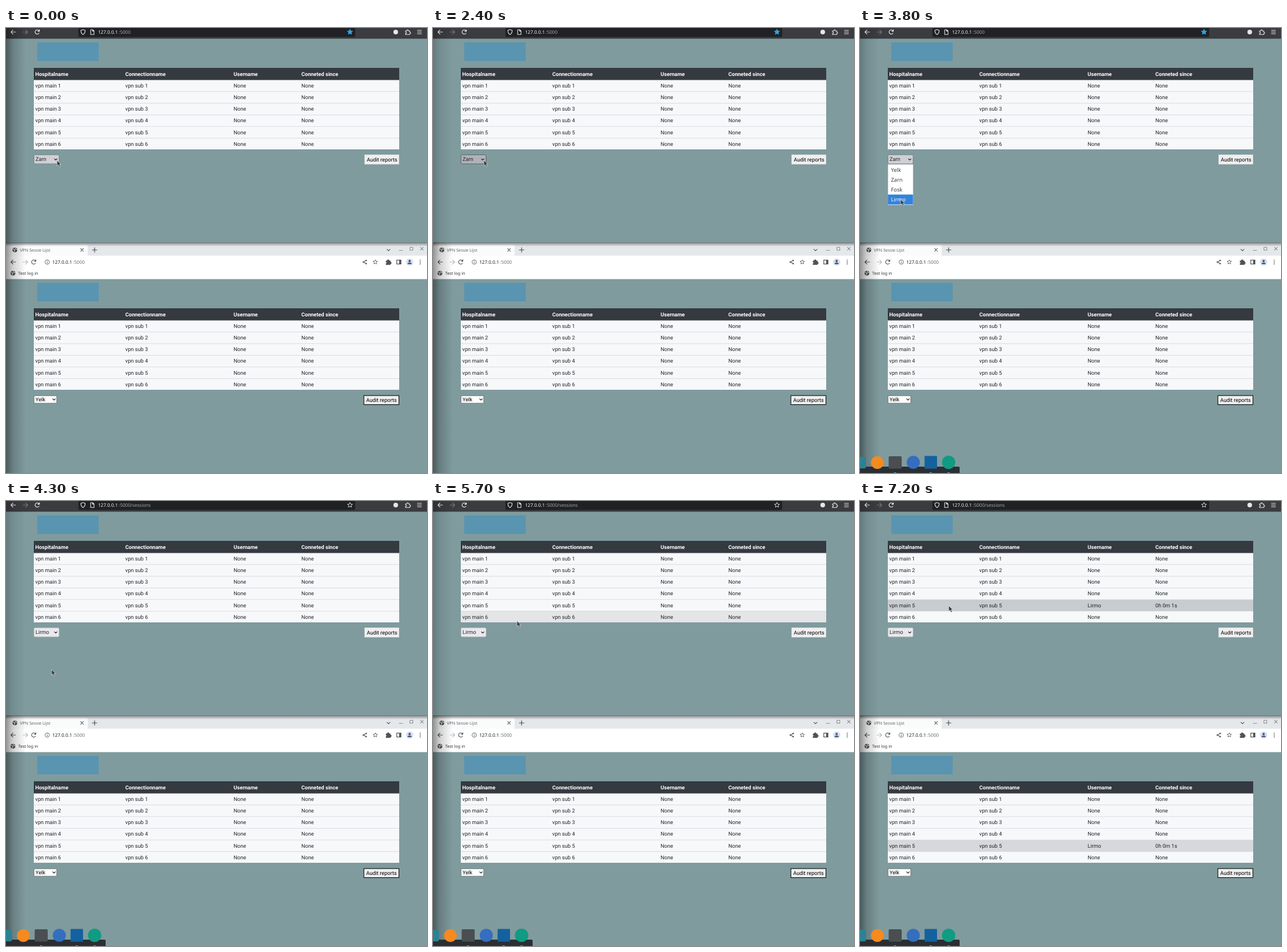
Animation, 727 px wide and 770 px high, one loop 8000 ms. Source, as an HTML page:

```html
<!DOCTYPE html>
<html lang="en">
<head>
<meta charset="utf-8">
<title>VPN session list</title>
<style>
html, body { margin: 0; width: 100%; height: 100%; overflow: hidden; background: #7f9b9e; }
svg { display: block; width: 727px; height: 770px; }
text { white-space: pre; text-rendering: geometricPrecision; }
.page { font: 9.15px Roboto, sans-serif; fill: #212529; }
.head { font-weight: 700; fill: #fff; }
.ui { font: 8.05px "Noto Sans", sans-serif; }
.small { font: 7.25px "Noto Sans", sans-serif; }
.menu { font: 9.25px "Noto Sans", sans-serif; }
.icon { fill: none; stroke-width: 1.1; stroke-linecap: round; stroke-linejoin: round; }
</style>
</head>
<body>
<svg id="stage" viewBox="0 0 727 770">
  <defs>
    <linearGradient id="side">
      <stop offset="0" stop-opacity=".42"/>
      <stop offset=".35" stop-opacity=".18"/>
      <stop offset="1" stop-opacity="0"/>
    </linearGradient>
    <linearGradient id="drop" x2="0" y2="1">
      <stop offset="0" stop-opacity=".42"/>
      <stop offset="1" stop-opacity="0"/>
    </linearGradient>
  </defs>
</svg>
<script>
const LOOP = 8000;
const USERS = ["Yelk", "Zarn", "Fosk", "Lirmo"];
const COLUMNS = [50.5, 206, 393, 510];
const ROW_TOP = 89.7, ROW_STEP = 20.2, LOWER = 416;
const OPTION_TOP = 236.6, OPTION_STEP = 17.2;
const stage = document.getElementById("stage");

function add(tag, attrs, parent = stage) {
  const el = document.createElementNS("http://www.w3.org/2000/svg", tag);
  for (const key in attrs) el.setAttribute(key, attrs[key]);
  return parent.appendChild(el);
}
const rect = (x, y, width, height, fill, more, parent) =>
  add("rect", { x, y, width, height, fill, ...more }, parent);
const circle = (cx, cy, r, fill, more, parent) => add("circle", { cx, cy, r, fill, ...more }, parent);
const line = (d, stroke, more, parent) => add("path", { d, stroke, class: "icon", ...more }, parent);
function label(x, y, content, cls = "page", more, parent) {
  const el = add("text", { x, y, class: cls, ...more }, parent);
  el.textContent = content;
  return el;
}

// Icons
function navigation(y, color, dim) {
  line(`M16.5 ${y}h-8m3.6-3.6l-3.6 3.6l3.6 3.6`, color);
  line(`M29.5 ${y}h8m-3.6-3.6l3.6 3.6l-3.6 3.6`, dim);
}
const reload = (x, y, color) =>
  line(`M${x + 3} ${y + 2}a3.7 3.7 0 1 1 0-4.2m.6-1.8v2.6h-2.6`, color, { "stroke-width": 1.3 });
function star(x, y, r, color, fill = "none") {
  const points = Array.from({ length: 10 }, (_, i) => {
    const a = i * Math.PI / 5 - Math.PI / 2, len = i % 2 ? r * .46 : r;
    return `${x + len * Math.cos(a)},${y + len * Math.sin(a)}`;
  });
  return add("polygon", { points: points.join(" "), fill, stroke: color, "stroke-width": .9, "stroke-linejoin": "round" });
}
const puzzle = (x, y, color, fill) =>
  line(`M${x - 3.6} ${y - 2}h2.3a1.4 1.4 0 1 1 2.6 0h2.3v2.2a1.3 1.3 0 1 1 0 2.5v1.6h-7.2v-1.8a1.3 1.3 0 1 0 0-2.5z`, color, { style: `fill:${fill}` });
function globe(x, y) {
  circle(x, y, 4.1, "#4b4f54");
  line(`M${x - 3} ${y - 1.4}l2.4 .8l.6 1.7l-1.2 1.6M${x + .6} ${y - 3}l1 1.8l1.8 .4`, "#fff", { "stroke-width": 1 });
}

// Page content shared by both windows
function sessions(dy) {
  const g = add("g", { transform: `translate(0 ${dy})` });
  rect(54, 25, 106, 32, "#5994b0", {}, g);
  rect(48, 69, 631, 20.7, "#343a40", {}, g);
  ["Hospitalname", "Connectionname", "Username", "Conneted since"]
    .forEach((name, c) => label(COLUMNS[c], 82.5, name, "page head", {}, g));
  const rows = [];
  for (let i = 0; i < 6; i++) {
    const y = ROW_TOP + i * ROW_STEP;
    const fill = rect(48, y, 631, i < 5 ? ROW_STEP : 19.3, "#f7f8fa", {}, g);
    rect(48, y - .5, 631, 1, i ? "#dadfe5" : "#454d55", {}, g);
    const values = [`vpn main ${i + 1}`, `vpn sub ${i + 1}`, "None", "None"];
    const cells = values.map((v, c) => label(COLUMNS[c], y + 13.1, v, "page", {}, g));
    rows.push({ fill, cells });
  }
  return rows;
}

rect(0, 0, 727, 770, "#7f9b9e");

// Upper window
rect(0, 0, 727, 18.5, "#3a3c40");
rect(125, -4, 478, 19.5, "#1f2124", { rx: 2 });
navigation(7, "#f4f4f5", "#77797d");
reload(54, 7, "#f4f4f5");
line("M133 2.7l3.7 1.3c0 3.5-1 6-3.7 7.4c-2.7-1.4-3.7-3.9-3.7-7.4z", "#e6e6e8");
line("M146.2 3h3.6l2.2 2.2v6h-5.8zM149.6 3v2.4h2.4", "#e6e6e8");
label(159, 10, "127.0.0.1", "ui", { fill: "#f5f5f6" });
const upperUrl = label(194.5, 10, "", "ui", { fill: "#a4a5a9" });
const savedStar = star(594, 7, 5, "#2ca6ea", "#2ca6ea");
const emptyStar = star(594, 7, 4.6, "#e6e6e8");
circle(673, 7, 4, "#e6e6e8");
puzzle(693.5, 7, "#e6e6e8", "none");
line("M710.5 4h7m-7 3h7m-7 3h7", "#e6e6e8");

const upperRows = sessions(0);
const select = rect(48.3, 219.4, 43.4, 15.6, "#cfcfd4", { rx: 2, "stroke-width": .8 });
const selected = label(51, 230.4, "");
line("M83.7 226.3l2.2 2.2l2.2-2.2", "#222");
rect(619.3, 219.3, 59.2, 16.4, "#efefef", { stroke: "#e4e4e4", "stroke-width": .7 });
label(623, 231, "Audit reports", "page", { style: "fill:#000" });
const upperShade = rect(0, 0, 34, 371, "url(#side)");

// Lower window
rect(0, 371.5, 727, 23, "#e5e8eb");
rect(0, 375, 141, 20, "#fafbfb", { rx: 3 });
rect(0, 394, 727, 40.5, "#fff");
rect(0, 371, 727, 7, "url(#drop)");
globe(15.3, 384);
label(24, 386.7, "VPN Sessie Lijst", "small", { fill: "#62666b" });
line("M129 381.7l4.6 4.6m0-4.6l-4.6 4.6", "#55595e");
line("M149 384h8m-4-4v8", "#43474c");
line("M657.8 382.8l2.7 2.7l2.7-2.7", "#55595e");
line("M679 384.7h6M697.5 379.5h5v5h-5zM715.7 379.3l5 5m0-5l-5 5", "#8b8f94", { "stroke-width": .9 });
navigation(405, "#4e5257", "#b6b9bd");
reload(48, 405, "#4e5257");
circle(71.2, 405, 3.8, "none", { stroke: "#5f6368", "stroke-width": .9 });
line("M71.2 404.7v2M71.2 402.9v.1", "#5f6368");
label(80, 407.8, "127.0.0.1", "ui", { fill: "#202124" });
label(115.6, 407.8, ":5000", "ui", { fill: "#6a6e73" });
line("M622 402.3l-4.8 2.7l4.8 2.7", "#55595e", { "stroke-width": .9 });
[[622, 402.2], [617, 405], [622, 407.8]].forEach(([x, y]) => circle(x, y, 1.3, "#55595e"));
star(637.7, 405, 4, "#55595e");
puzzle(660, 405, "#4e5257", "#4e5257");
rect(674.8, 401.6, 7.2, 6.8, "none", { stroke: "#4e5257", "stroke-width": 1.2 });
rect(679, 401.6, 3, 6.8, "#4e5257");
circle(697, 405, 6.2, "#d5dff0");
circle(697, 403.2, 1.9, "#405173");
add("path", { d: "M693.3 408.5c0-3.6 7.4-3.6 7.4 0z", fill: "#405173" });
[401.8, 405, 408.2].forEach(y => circle(715.3, y, .9, "#4e5257"));
globe(12, 424.3);
label(21, 427, "Test log in", "small", { fill: "#303338" });

const lowerRows = sessions(LOWER);
rect(48.4, 636.3, 39.2, 12.8, "#fff", { stroke: "#6c7072", "stroke-width": .8 });
label(51, 646, USERS[0], "page", { style: "fill:#000" });
line("M80.7 641.6l2.2 2.2l2.2-2.2", "#111", { "stroke-width": 1.3 });
rect(618, 636, 60.5, 15.6, "#efefef", { stroke: "#15191a", "stroke-width": 1.2 });
label(622, 647, "Audit reports", "page", { style: "fill:#000" });
rect(0, 371, 34, 399, "url(#side)");

// Dock
const dock = add("g", {});
rect(-8, 759, 180, 20, "#2a2f34", { rx: 2 }, dock);
rect(-12, 742, 22, 20, "#2b8294", { rx: 2 }, dock);
circle(30, 752, 11, "#f58a1f", {}, dock);
rect(49.5, 741, 22.5, 21.5, "#4a4e50", { rx: 2 }, dock);
circle(92, 751.5, 11.3, "#356ebf", {}, dock);
rect(111.5, 740.5, 21.5, 22, "#14619f", { rx: 1 }, dock);
circle(153, 751.5, 11.5, "#109b83", {}, dock);
[60.5, 122, 153].forEach(x => rect(x - 2, 769, 4, 1, "#78a9bd", {}, dock));

// Option list
const popup = add("g", {});
rect(48, 235.8, 44, 70.6, "#fff", { stroke: "#8d9698", "stroke-width": .7 }, popup);
const highlight = rect(48.2, 0, 43.4, OPTION_STEP, "#3383da", {}, popup);
const options = USERS.map((name, i) =>
  label(53.5, OPTION_TOP + i * OPTION_STEP + 11.9, name, "menu", {}, popup));

const pointer = add("path", {
  d: "M0 0v9.6l2.2-1.9l1.8 3.7l1.8-.9l-1.8-3.5h3z",
  fill: "#363b40", stroke: "#e8ecec", "stroke-width": .65, "stroke-linejoin": "round"
});

// Pointer moves: start, end, from, to
const MOVES = [
  [500, 600, [88, 229], [87.8, 228.8]],
  [3100, 3800, [87.8, 228.8], [70, 296.5]],
  [4100, 4900, [70, 296.5], [126, 265]],
  [5200, 6000, [126, 265], [153.8, 181]],
  [6500, 6700, [153.8, 181], [153.2, 181.2]]
];
const DOCK = [[0, 60], [2700, 30], [2800, 12], [2900, 3], [3000, 0]];
const SELECT = [[0, "#cfcfd4"], [2400, "#b1b1b9"], [2700, "#cfcfd4"], [4100, "#e9e9ed"]];

const at = (steps, t) => steps.filter(s => s[0] <= t).pop()[1];
function pointerAt(t) {
  const [start, end, from, to] = MOVES.filter(m => m[0] <= t).pop() || MOVES[0];
  const p = Math.min(1, Math.max(0, (t - start) / (end - start)));
  const eased = p * p * (3 - 2 * p);
  return from.map((v, i) => v + (to[i] - v) * eased);
}
const show = (el, on) => el.setAttribute("visibility", on ? "visible" : "hidden");

function paint(time) {
  const t = Math.floor(time / 100) * 100;
  const [x, y] = pointerAt(t);
  const open = t >= 2700 && t < 4100, chosen = t >= 4100;
  const visited = t >= 4300, connected = t >= 6200;

  pointer.setAttribute("transform", `translate(${x} ${y})`);
  dock.setAttribute("transform", `translate(0 ${at(DOCK, t)})`);
  select.setAttribute("fill", at(SELECT, t));
  select.setAttribute("stroke", chosen ? "#b6babd" : t >= 2400 && !open ? "#4e5558" : "#747b80");
  selected.textContent = USERS[chosen ? 3 : 1];
  upperUrl.textContent = visited ? ":5000/sessions" : ":5000";
  upperShade.setAttribute("opacity", t < 2400 ? 1 : .5);
  show(savedStar, !visited);
  show(emptyStar, visited);

  show(popup, open);
  const hovered = Math.floor((y - OPTION_TOP) / OPTION_STEP);
  const active = t < 3200 || hovered < 0 ? 1 : Math.min(3, hovered);
  highlight.setAttribute("y", OPTION_TOP + active * OPTION_STEP);
  options.forEach((el, i) => el.setAttribute("fill", i === active ? "#fff" : "#3a3e42"));

  upperRows.forEach((row, i) => {
    const over = y >= ROW_TOP + i * ROW_STEP && y < ROW_TOP + (i + 1) * ROW_STEP && y < 210;
    row.fill.setAttribute("fill", connected && i === 4 ? "#c8cbcf" : over ? "#e4e5e6" : "#f7f8fa");
  });
  lowerRows[4].fill.setAttribute("fill", connected ? "#d6d8db" : "#f7f8fa");
  for (const { cells } of [upperRows[4], lowerRows[4]]) {
    cells[2].textContent = connected ? USERS[3] : "None";
    cells[3].textContent = connected ? `0h 0m ${t >= 7200 ? 1 : 0}s` : "None";
  }
}

const began = performance.now();
function tick() {
  paint((performance.now() - began) % LOOP);
  requestAnimationFrame(tick);
}
tick();
</script>
</body>
</html>
```
